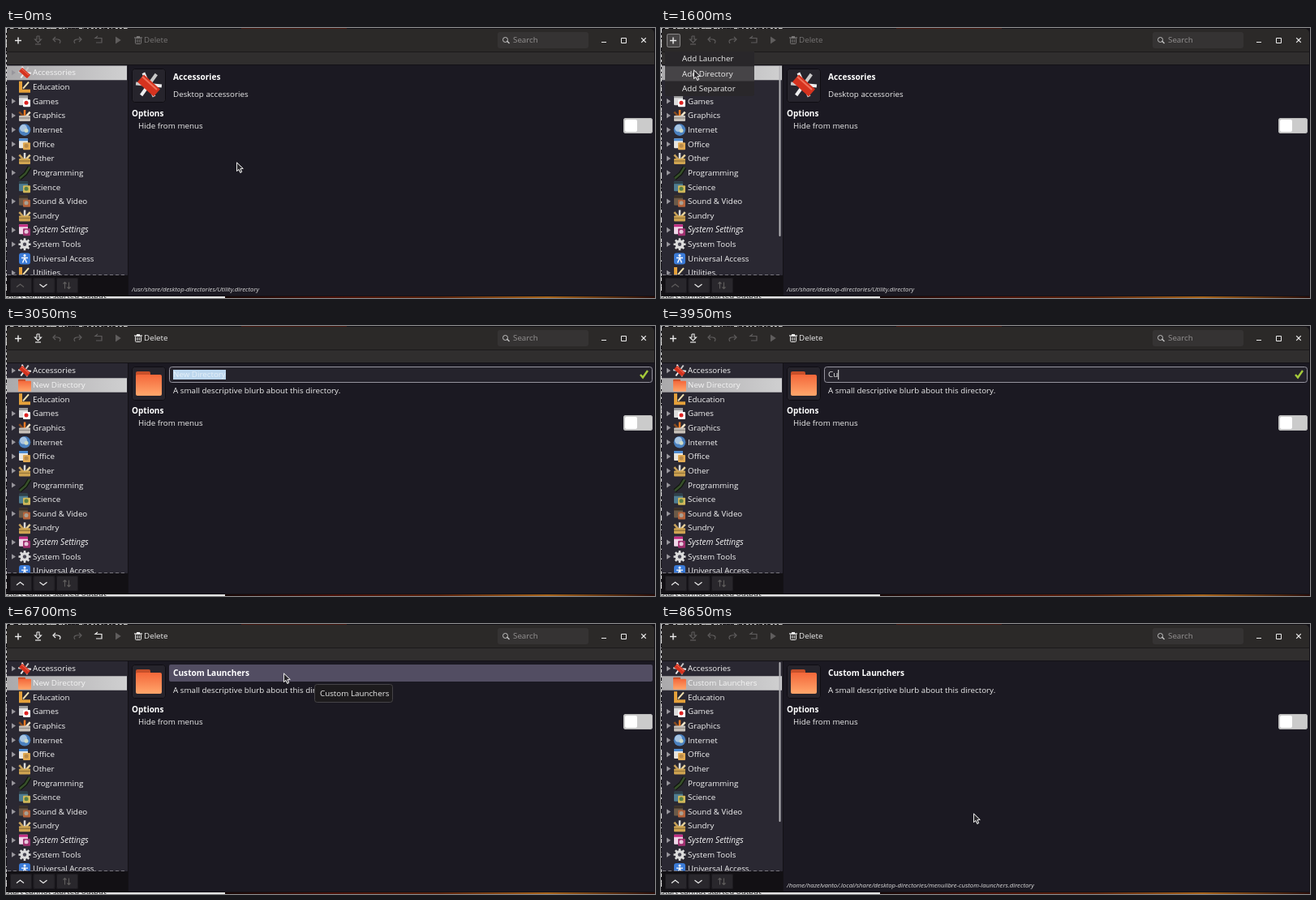
An HTML page with a canvas for the animation above (8.7 s loop, 800 px wide and 333 px high).

```html
<!DOCTYPE html>
<html lang="en">
<head>
<meta charset="utf-8">
<title>Menu editor</title>
<style>
html, body { margin: 0; width: 100%; height: 100%; overflow: hidden; background: #1b1922 }
canvas { display: block }
</style>
</head>
<body>
<canvas id="stage" width="800" height="333"></canvas>
<script>
const g = document.getElementById('stage').getContext('2d');
const LOOP = 8700, GLIDE = 500, ROW = 17.65;
const LIGHT = '#ececec', DIM = '#5f5d5d', DARK = '#131116';
const NAME = 'Custom Launchers', FRESH = 'New Directory';

// Moments of the story, in ms
const MENU = 950, CREATE = 1700, EDIT = 2690, TYPE = 3600, KEY = 130,
  COMMIT = 6150, TIP = 6480, LEAVE = 6850, SAVE = 7700;

// Pointer stops: start of the glide and where it ends
const STOPS = [
  [-GLIDE, 284, 166], [250, 14, 13], [1100, 40, 52], [1800, 342, 61],
  [LEAVE, 38, 13], [7900, 385, 234]
];

const within = (t, from, to) => t >= from && t < to;

function seeded(seed) {
  return () => (seed = seed * 16807 % 2147483647) / 2147483647;
}
function rect(c, x, y, w, h, r = 0) {
  g.fillStyle = c;
  g.beginPath();
  g.roundRect(x, y, w, h, r);
  g.fill();
}
function frame(c, x, y, w, h, r = 2) {
  g.strokeStyle = c;
  g.lineWidth = 1;
  g.beginPath();
  g.roundRect(x + .5, y + .5, w - 1, h - 1, r);
  g.stroke();
}
function panel(fill, edge, ...box) {
  rect(fill, ...box);
  frame(edge, ...box);
}
function disc(c, x, y, r) {
  g.fillStyle = c;
  g.beginPath();
  g.arc(x, y, r, 0, 7);
  g.fill();
}
function line(c, w, ...p) {
  g.strokeStyle = c;
  g.lineWidth = w;
  g.beginPath();
  for (let i = 0; i < p.length; i += 2) g.lineTo(p[i], p[i + 1]);
  g.stroke();
}
function spokes(colors, n, x, y, r, w, from = 0, turn = 2 * Math.PI) {
  for (let i = 0; i < n; i++) {
    const a = from + turn * i / n;
    line(colors[i % colors.length], w, x, y, x + r * Math.cos(a), y + r * Math.sin(a));
  }
}
function chevron(c, x, y, w, h) {
  line(c, 1.2, x - w, y - h, x, y, x + w, y - h);
}
function triangle(c, x, y, r) {
  g.fillStyle = c;
  g.beginPath();
  g.moveTo(x, y - r);
  g.lineTo(x + r * 1.5, y);
  g.lineTo(x, y + r);
  g.fill();
}
function gradient(x0, y0, x1, y1, ...colors) {
  const f = g.createLinearGradient(x0, y0, x1, y1);
  colors.forEach((c, i) => f.addColorStop(i / (colors.length - 1), c));
  return f;
}
function text(s, x, y, c = LIGHT, style = '', size = 9.8) {
  g.font = `${style} ${size}px "Open Sans", "Noto Sans", sans-serif`;
  g.fillStyle = c;
  g.fillText(s, x, y + 3.3);
}
function at(x, y, sx, sy, draw) {
  g.save();
  g.translate(x, y);
  g.scale(sx, sy);
  draw();
  g.restore();
}

// Icons around their centre, 16 units wide
const tile = (back, band, front, dot) => () => {
  rect(back, -7, -7, 11, 12, 1);
  rect(band, -7, -7, 11, 3);
  rect(front, -2, -2, 9, 9, 1);
  disc(dot, 2, 2, 2.5);
};
const toolbox = (box, ...tools) => () => {
  spokes(tools, 3, 0, 3, 10, 2.5, -2.3, 2.2);
  rect(box, -7, 0, 14, 7, 1);
  line('#0004', 1.5, -7, 3, 7, 3);
};
const slant = (colors, w) => () =>
  colors.forEach((c, i) => line(c, w / (i + 1), -6, 7, 1, 1, 6, -7));
const icon = {
  knife() {
    spokes(['#eee', '#c9c9c9'], 6, 0, 0, 8, 2, .1);
    line('#d5331f', 6, -5, -4, 5, 5);
    line('#f0705a', 1, -4, -5, 5, 3);
  },
  folder() {
    rect('#c8502a', -8, -7, 9, 6, 1);
    rect(gradient(0, -5, 0, 7, '#f4673a', '#ffa268'), -8, -5, 16, 13, 1);
  },
  ruler() {
    line('#e5a13a', 4, -5, -7, -5, 5, 7, 5);
    line('#f3e2b0', 2, -2, 2, 5, -6);
  },
  cards: tile('#ddd', '#999', '#fff', '#d22'),
  paint: toolbox('#c9c3bb', '#8a4b1e', '#ee7b24', '#f5e6c8'),
  globe() {
    disc('#4a80be', 0, 0, 7.3);
    disc('#a9c6e2', -1.5, -2, 4.5);
    disc('#cfdcc6', 2, 1, 2.5);
  },
  office: tile('#e9e6df', '#4d8ad0', '#e2aa52', '#b88a4a'),
  box: toolbox('#d0a552', '#c9a35c', '#d8d8d8', '#e9d39b'),
  quill: slant(['#10160e', '#37502a'], 5),
  science: tile('#4f7d92', '#2f4048', '#d0b85a', '#588046'),
  film: tile('#6b5a48', '#3b3026', '#b5643c', '#a9a093'),
  settings: tile('#f0d7e8', '#c22c82', '#a03070', '#e8c8dc'),
  gear() {
    spokes(['#dcdcdc'], 8, 0, 0, 7.5, 2.6);
    disc('#dcdcdc', 0, 0, 5.5);
    disc('#4b4955', 0, 0, 2.2);
  },
  access() {
    rect('#3b7bd8', -7, -7, 14, 14, 3);
    disc('#fff', 0, -4, 1.5);
    line('#fff', 1.4, -4, -1, 4, -1);
    line('#fff', 1.4, -2.5, 5, 0, -1, 2.5, 5);
  }
};

// Name, icon, and whether it has no children
const ENTRIES = [
  ['Accessories', 'knife'], ['Education', 'ruler', 'leaf'], ['Games', 'cards'],
  ['Graphics', 'paint'], ['Internet', 'globe'], ['Office', 'office'],
  ['Other', 'box'], ['Programming', 'quill'], ['Science', 'science', 'leaf'],
  ['Sound & Video', 'film'], ['Sundry', 'box', 'leaf'], ['System Settings', 'settings'],
  ['System Tools', 'gear'], ['Universal Access', 'access', 'leaf'], ['Utilities', 'ruler']
];

function pointer(t) {
  let x, y;
  for (const [start, toX, toY] of STOPS) {
    if (t < start) break;
    const u = Math.min(1, (t - start) / GLIDE), e = u * u * (3 - 2 * u);
    x = x === undefined ? toX : x + (toX - x) * e;
    y = y === undefined ? toY : y + (toY - y) * e;
  }
  return [x, y];
}

// Slivers of other windows around the edge
function desktop() {
  const rnd = seeded(11);
  rect(DARK, 0, 0, 800, 333);
  rect('#d8d8d8', 0, 0, 1, 333);
  for (let y = 0; y < 333; y += 6) rect(DARK, 0, y, 1, rnd() * 6);
  for (let x = 0; x < 150; x += 5) rect('#c8c8c8', x, 0, rnd() * 5, 1);
  rect('#45160f', 290, 0, 130, 1);
  rect('#e4e4e4', 0, 331, 270, 2);
  text('start cannot started output', 0, 330, '#222');
  rect(gradient(270, 0, 800, 0, '#180807', '#4a120a', '#5a220c', '#a8641a', '#2a0c08'), 270, 331, 530, 2);
}

function bentArrow(c, x, dir) {
  at(x, 15, dir, 1, () => {
    line(c, 1.2, -2, -4, -5, -1, -2, 2);
    g.beginPath();
    g.moveTo(-5, -1);
    g.bezierCurveTo(2, -2, 6, 0, 3, 4);
    g.stroke();
  });
}

function toolbar(t, dirty) {
  rect('#2b2928', 1, 1, 798, 28, [5, 5, 0, 0]);
  rect('#1c1a1b', 1, 29, 798, 1);
  rect('#302e2e', 1, 30, 798, 15);
  rect(DARK, 1, 45, 798, 1);

  if (within(t, 730, 2500)) panel(within(t, MENU, CREATE) ? '#454343' : '#302e2e', '#8a8888', 7, 7, 17, 17, 2);
  if (within(t, 7300, 8000)) frame('#777575', 31, 7, 17, 17);
  spokes([LIGHT], 4, 15, 15.5, 4, 1.4);

  const save = dirty ? LIGHT : DIM;
  line(save, 1.1, 38, 10, 38, 14, 35.5, 14, 39.5, 18, 43.5, 14, 41, 14, 41, 10, 38, 10);
  line(save, 1.2, 36, 20, 43, 20);

  const undo = within(t, COMMIT, SAVE) ? LIGHT : DIM;
  bentArrow(undo, 63, 1);
  bentArrow(DIM, 88, -1);
  line(undo, 1.2, 113, 10, 110, 12.5, 118, 12.5, 118, 18, 111, 18);
  triangle(DIM, 135, 15, 4.5);

  const del = t >= CREATE ? LIGHT : '#777575';
  line(del, 1.2, 158, 12, 168, 12);
  rect(del, 161, 10, 4, 2);
  frame(del, 159, 12, 8, 8, 1);
  for (const x of [161.8, 164.2]) line(del, 1, x, 14, x, 18);
  text('Delete', 170, 15, del);

  rect('#353333', 606, 5, 112, 20, 3);
  frame('#c4c4c4', 612, 11, 7, 7, 3);
  line('#c4c4c4', 1.4, 617.5, 16, 620.5, 19);
  text('Search', 625, 15, '#949292');

  rect(LIGHT, 734, 17, 6, 1);
  frame(LIGHT, 758, 12, 7, 7, 0);
  spokes([LIGHT], 4, 786, 15, 4, 1.1, Math.PI / 4);
}

function sidebar(t) {
  const made = t >= CREATE;
  const rows = [...ENTRIES];
  if (made) rows.splice(1, 0, [t < SAVE ? FRESH : NAME, 'folder', 'leaf']);
  rect('#2a2832', 1, 46, 149, 259);
  g.save();
  g.beginPath();
  g.rect(1, 46, 149, 258.5);
  g.clip();
  rows.forEach(([name, art, leaf], i) => {
    const y = 55 + i * ROW;
    if (i === +made) rect(gradient(1, 0, 148, 0, '#aaa9ab', '#cfcfd0'), 1, y - 8.5, 148, ROW);
    if (!leaf) triangle('#98969c', 7, y, 3.3);
    at(23, y, 1, 1, icon[art]);
    text(name, 33, y, '#f4f4f4', art === 'settings' ? 'italic' : '', art === 'settings' ? 10.2 : 9.8);
  });
  g.restore();
  if (within(t, 550, 1950) || t > 7250) rect('#b4b3b7', 145.5, 47, 2, made ? 197 : 210, 1);

  g.setLineDash([4, 3]);
  line('#77757d', 1, 2, 304.5, 149, 304.5);
  g.setLineDash([]);
  rect('#121014', 1, 305, 149, 25);
  for (let i = 0; i < 3; i++) panel('#29272c', '#1c1a1f', 5 + i * 28.5, 308, 27, 19, 2);
  chevron(made ? LIGHT : DIM, 17.5, 316, 4.5, -3.5);
  chevron(LIGHT, 46, 319.5, 4.5, 3.5);
  for (const dir of [-1, 1]) at(75 + dir * 2.5, 317.5, 1, dir, () => {
    line(DIM, 1.1, 0, -4, 0, 4);
    chevron(DIM, 0, 4, 2, 2);
  });
  rect(DARK, 150, 46, 1, 284);
}

function entry(t) {
  panel('#25232c', '#96949f', 201, 50, 596, 20, 3);
  line('#a6cb3a', 2.4, 782, 60, 785, 63.5, 791, 55);
  const count = Math.floor((t - TYPE) / KEY);
  if (count < 1) {
    rect('#bdd7ee', 206, 54, 65, 12);
    text(FRESH, 206, 60, '#e6f0f8');
    return;
  }
  const typed = NAME.slice(0, count);
  text(typed, 206, 60);
  rect(LIGHT, 206 + g.measureText(typed).width, 54, 1, 12);
}

function details(t, dirty) {
  const made = t >= CREATE, editing = within(t, EDIT, COMMIT);
  const lift = editing ? 1.2 : 0;
  rect('#1b1922', 151, 46, 648, 284);
  panel('#26242c', '#0f0d13', 155, 50, 42, 42, 3);
  at(176, 70, 2, 2, made ? icon.folder : icon.knife);

  if (editing) entry(t);
  else {
    if (within(t, 2080, EDIT) || within(t, COMMIT, 6980)) rect('#524d62', 201, 50, 596, 21, 2);
    text(!made ? 'Accessories' : t < COMMIT ? FRESH : NAME, 206, 60.5, '#fff', 'bold', 10.15);
  }
  text(made ? 'A small descriptive blurb about this directory.' : 'Desktop accessories', 206, 81.3 - lift);
  text('Options', 155, 105.8 - lift, '#fff', 'bold', 10);
  text('Hide from menus', 163, 120.8 - lift);

  const y = editing ? 110 : 111;
  panel('#cbcbcb', '#b9b9b9', 761, y, 36, 19, 3);
  rect('#fff', 763, y + 2, 15, 15, 2);

  if (!dirty) text(made
    ? '/home/hazelvanto/.local/share/desktop-directories/menulibre-custom-launchers.directory'
    : '/usr/share/desktop-directories/Utility.directory', 155, 321.8, '#dcdcdc', 'italic', 7.75);
}

function popups(t) {
  if (within(t, MENU, CREATE)) {
    const row = Math.floor((pointer(t)[1] - 29) / 18.3);
    rect('#29272a', 5, 29, 110, 55, [0, 0, 3, 3]);
    ['Launcher', 'Directory', 'Separator'].forEach((kind, i) => {
      const y = 38 + i * 18.3;
      if (i === row) rect('#464447', 5, y - 9, 110, 18.3);
      text('Add ' + kind, 26, y);
    });
  }
  if (within(t, TIP, LEAVE)) {
    panel('#1d1b1d', '#454347', 380, 74, 97, 23, 3);
    text(NAME, 387, 85.7);
  }
}

function cursor(t) {
  if (within(t, EDIT, COMMIT)) return;
  at(...pointer(t), 1, 1, () => {
    line('#e4e4e4', 1, .5, 0, .5, 10.5, 3, 8.3, 4.8, 12.3, 6.6, 11.5, 4.9, 7.6, 8.2, 7.4, .5, 0);
    g.fillStyle = '#2a282c';
    g.fill();
    g.stroke();
  });
}

function draw(t) {
  const dirty = within(t, CREATE, SAVE);
  desktop();
  toolbar(t, dirty);
  sidebar(t);
  details(t, dirty);
  popups(t);
  cursor(t);
}

const start = performance.now();
(function tick() {
  draw((performance.now() - start) % LOOP);
  requestAnimationFrame(tick);
})();
</script>
</body>
</html>
```
